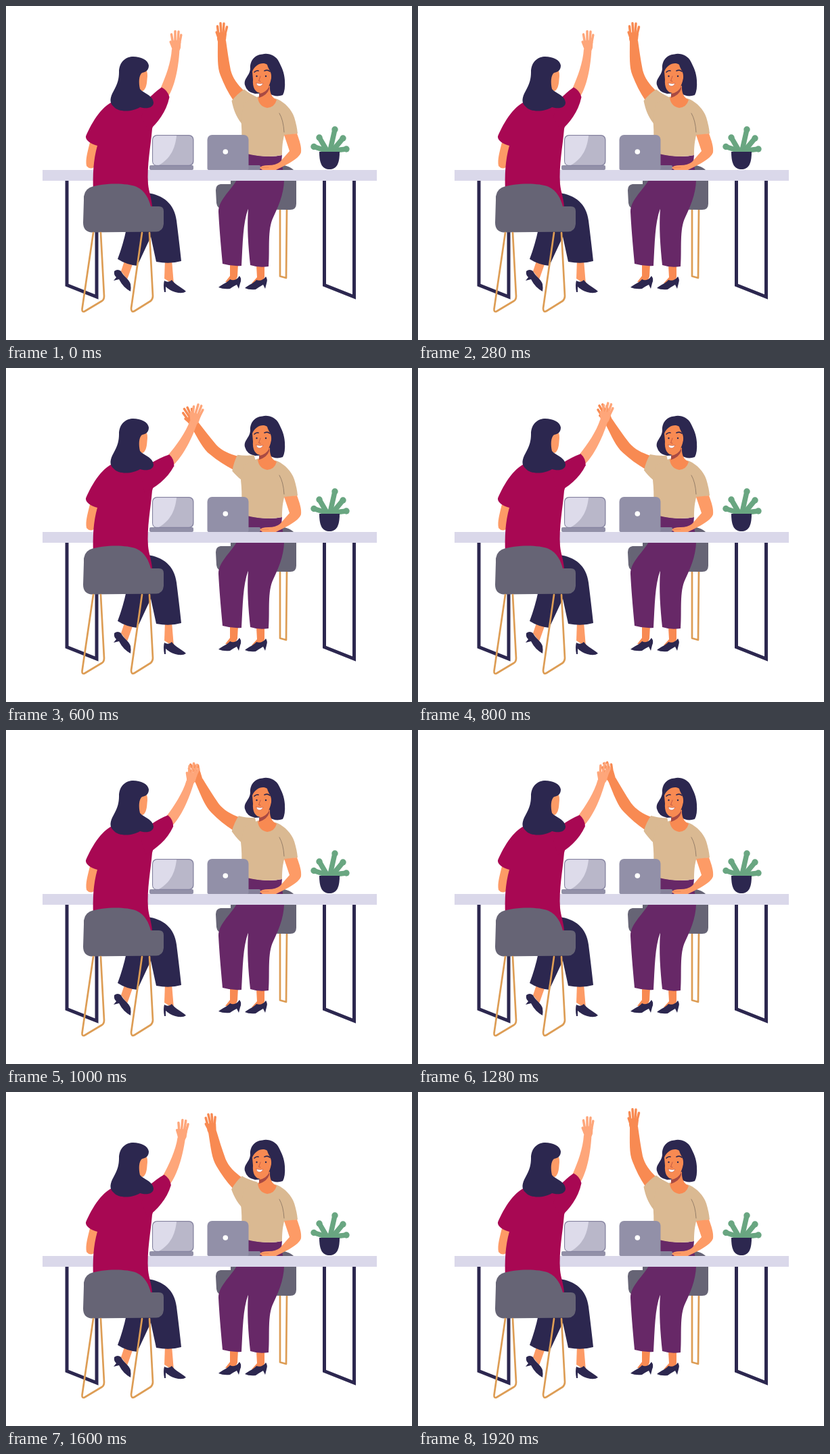
Animation, 600 px wide and 495 px high, one loop 3.48 s. Source, as an HTML page with a canvas:

```html
<!DOCTYPE html>
<html lang="en">
<head>
<meta charset="utf-8">
<title>High five</title>
<style>
  html, body { margin: 0; width: 100%; height: 100%; overflow: hidden; background: #fff; }
  canvas { display: block; }
</style>
</head>
<body>
<canvas id="stage" width="600" height="495"></canvas>
<script>
const ctx = document.getElementById('stage').getContext('2d');
const LOOP = 3480, STEP = 40;
const NAVY = '#2c274f', GREY = '#666475', STEEL = '#9290a8', WOOD = '#dd9d55',
      RED = '#a80853', TAN = '#dab992', PURPLE = '#672867', GREEN = '#69a681',
      SKIN = '#f88a52', PALE = '#fea67a', WARM = '#fd9b66', CREASE = '#86705f';

function fill(d, color) {
  ctx.fillStyle = color;
  ctx.fill(new Path2D(d));
}

function stroke(d, color, width, cap = 'round', join = 'round') {
  ctx.strokeStyle = color;
  ctx.lineWidth = width;
  ctx.lineCap = cap;
  ctx.lineJoin = join;
  ctx.stroke(new Path2D(d));
}

function box(x, y, w, h, r, color) {
  ctx.fillStyle = color;
  ctx.beginPath();
  ctx.roundRect(x, y, w, h, r);
  ctx.fill();
}

function dot(x, y, r, color) {
  ctx.fillStyle = color;
  ctx.beginPath();
  ctx.arc(x, y, r, 0, Math.PI * 2);
  ctx.fill();
}

function turned(x, y, degrees, draw) {
  ctx.save();
  ctx.translate(x, y);
  ctx.rotate(degrees * Math.PI / 180);
  ctx.translate(-x, -y);
  draw();
  ctx.restore();
}

// How far the arms have swung: 1 is palm to palm
const KEYS = [[280, 0], [600, 1.28], [1000, 1.02], [1200, 1], [1900, 0]];

function swing(t) {
  for (let i = 1; i < KEYS.length; i++) {
    const [t0, a] = KEYS[i - 1], [t1, b] = KEYS[i];
    if (t < t1) {
      const u = Math.max(0, (t - t0) / (t1 - t0));
      return a + (b - a) * (1 - Math.cos(Math.PI * u)) / 2;
    }
  }
  return 0;
}

function tableLegs() {
  for (const x of [90, 470.5])
    stroke(`M${x} 258V413.5L${x + 44} 431V258`, NAVY, 5, 'butt', 'miter');
}

function rightSeat() {
  stroke('M405 300V400.5L414 403L415 300', WOOD, 2.7);
  fill('M332 250L332 264L317 264Q310 265 310 273L311 292Q312 300 320 301L420 302Q429 302 429 293V252Q428 240 411 236L396 240Z', GREY);
}

function rightLegs() {
  fill('M331 382L331 400L324 409L338 410L342 401L343 382Z', SKIN);
  fill('M370 384L371 402L363 411L379 411L382 402L382 384Z', SKIN);
  fill('M314 417C320 412 327 410 331 405Q339 409 345 400Q349 405 346 411L344 419L341 413Q335 416 331 419Q321 420 314 417Z', NAVY);
  fill('M353 418C359 413 366 411 370 406Q378 409 384 401Q387 405 385 411L383 419L380 413Q373 417 369 420Q359 421 353 418Z', NAVY);
  fill('M356 218Q385 226 408 221Q406 232 411 250C412 272 406 290 395 313C386 331 390 360 388 386Q373 388 361 384C358 355 356 328 358 300C350 322 350 350 348 385Q334 386 320 382C317 350 315 325 314 305C314 288 330 276 341 258Z', PURPLE);
}

function rightHair() {
  fill('M361 93C360 80 369 72 379 71.5C388 69 399 74 403 82C408 92 411 98 412 110Q413 125 409 132Q398 136 388 129L368 130Q356 128 353 117C351 107 360 104 361 93Z', NAVY);
}

function rightBody() {
  fill('M373 134C384 135 395 136 401 138C412 143 422 153 426 165Q430 178 431 189L411 192C408 204 408 214 408 221Q385 226 356 219L348 200Q349 184 347 166L352 143Z', TAN);
  fill('M375 125L390 118Q389 134 400 139Q397 150 386 151Q374 149 372 136Q376 134 375 125Z', SKIN);
  fill('M374 130Q385 128 389 119L389 123Q386 132 374 136Z', '#a94a43');
  fill('M364 97C368 87 379 82 386 87C388 95 393 97 392 107C389 121 385 127 377 129C368 129 364 120 365 109Z', SKIN);
  stroke('M367 98Q370 95 373 96M382 96Q387 94 390 97', NAVY, 1.7);
  dot(370.5, 104, 1.2, NAVY);
  dot(384, 104, 1.2, NAVY);
  stroke('M376 104L373.5 111L376 111.5', '#bd5544', .9);
  fill('M370 114Q375 116 380 114.5Q377 120 373 118.5Q370 117 370 114Z', '#fff');
  stroke('M370 114Q375 116 380 114.5Q377 120 373 118.5Q370 117 370 114Z', '#b74e43', .5);
  stroke('M404 159Q410 169 411 187', CREASE, .8);
}

function hand(fingers, palm, color) {
  fill(palm, color);
  for (const [x0, y0, x1, y1] of fingers)
    stroke(`M${x0} ${y0}L${x1} ${y1}`, color, 3.5);
}

function rightArm(p) {
  turned(357, 145, -23 * p, () => {
    hand([[314, 43, 312.5, 30], [318, 40, 317, 25.5], [321, 40, 322, 26], [323.5, 43, 326.5, 31], [314, 47, 311.2, 39]],
      'M312 41Q319 36 326 41L325 50Q323 56 319 57Q313 56 312 49Z', SKIN);
    fill('M313 52C313 75 312 91 317 103C322 116 328 128 336 140L352 126C342 116 335 107 332 95C329 80 327 65 325 51Z', SKIN);
    fill('M352 123.5Q342 130 333.5 140.5C336 153 340 164 348 174L366 168L373 136Q360 130 352 123.5Z', TAN);
    stroke('M353 156Q348 163 348 170', CREASE, .8);
  });
}

function table() {
  ctx.fillStyle = '#dad8ea';
  ctx.fillRect(54, 243, 494, 16);
}

function laptops() {
  box(337, 236, 39, 7, 2, '#85829a');
  box(297.5, 191, 61, 52, [7, 7, 2, 2], STEEL);
  dot(324.3, 216, 3.8, '#fff');

  box(212, 236, 65, 7, 2, STEEL);
  box(216, 191, 61.5, 46, 7, '#8583a0');
  box(217.2, 192.2, 59, 43.6, 6, '#b9b7c9');
  fill('M223 192.2H252C250 211 243 226 226 235.8H222Q217.2 235 217.2 230V198Q218 193 223 192.2Z', '#dddbea');
}

function restingArm() {
  fill('M411 191L430 189C434 200 437 209 436 217C433 227 411 237 399 243H379L375 240Q377 236 388 236Q399 236 405 231L419 215Z', WARM);
  stroke('M377 239.5L388 239', '#d97850', .6);
}

function leaf(x0, y0, x1, y1) {
  stroke(`M${x0} ${y0}L${x1} ${y1}`, GREEN, 7.5);
  dot(x1, y1, 4.7, GREEN);
}

function plant() {
  leaf(479, 214, 486, 183);
  leaf(474, 214, 463, 195);
  leaf(483, 214, 498, 196);
  leaf(472, 214, 455, 208.5);
  leaf(486, 214, 503, 212);
  fill('M463 216H493C493 235 488 242 478 242C468 242 463 235 463 216Z', NAVY);
}

function leftLegs() {
  fill('M175 378L170 393L179 405L181 400L188 380Z', WARM);
  fill('M235 376L234 404L248 413L245 376Z', WARM);
  fill('M160 393Q165 389 170 393C173 400 182 405 184 412Q185 418 184 423Q173 417 167 405L159 407L163 402Q159 399 160 393Z', NAVY);
  fill('M234 407Q240 411 245 406C250 413 261 418 266 423Q261 427 250 424Q241 421 236 416L236 424L234 424Q232 413 234 407Z', NAVY);
  fill('M209 277C232 280 249 293 252 318Q256 350 259 378Q242 383 222 379L214 342L194 385Q177 383 165 375Q173 354 178 330Z', NAVY);
}

function leftBody() {
  fill('M124 202C121 215 117 227 119 237Q124 243 130 239L137 204Z', WARM);
  fill('M163 140C143 145 127 172 118 193C117 199 126 205 135 207C129 228 128 250 129 275L205 290L211 297H216C215 284 211 275 210 264C208 236 214 207 216 182L222 160L212 140Z', RED);
}

function leftArm(p) {
  turned(209, 164, 12.8 * p, () => {
    hand([[246.5, 54, 244.5, 42], [250, 52, 250, 37.5], [254, 52, 255, 38], [256.5, 55, 258.8, 43], [246, 60, 243.2, 53]],
      'M244.5 53Q251 48 258.5 53L258 62Q256 69 251 69Q245 67 244.5 60Z', PALE);
    fill('M245 64C244 83 236 105 228 123L240 134C249 119 255 93 256.5 64Z', PALE);
    fill('M230 120.5Q219 128 207 141L200 165L211 185C224 173 237 157 241.5 135Q239 125 230 120.5Z', RED);
  });
}

function leftHead() {
  fill('M196 101L207 95Q210 98 208.5 109C208 118 206 124 202 126L195 124Z', WARM);
  fill('M167 98C167 82 178 75 188 75C199 75 210 80 211 88C211 95 207 98 201 99C196 103 196 114 198 123C204 130 217 132 218 143C218 151 208 153 198 150C187 157 166 158 159 149C152 143 154 135 159 126C165 115 167 108 167 98Z', NAVY);
}

function leftSeat() {
  fill('M115 288Q114 274 124 269C146 262 177 262 193 268C206 274 211 286 214 297L226 297Q233 297 233 304V323Q232 334 222 334.5L126 335.5Q114 334 114 321Z', GREY);
  stroke('M129 336L112.5 449Q112 455 117 452L142 437Q145 435 145 430L140 336', WOOD, 2.7);
  stroke('M201 336L185 448Q185 455 190 452L214 437Q217 434 217 430L212 336', WOOD, 2.7);
}

function render(t) {
  const p = swing(t);
  ctx.fillStyle = '#fff';
  ctx.fillRect(0, 0, 600, 495);
  tableLegs();
  rightSeat();
  rightLegs();
  rightHair();
  rightArm(p);
  rightBody();
  table();
  laptops();
  restingArm();
  plant();
  leftLegs();
  leftBody();
  leftArm(p);
  leftHead();
  leftSeat();
}

const start = performance.now();

function tick() {
  const t = (performance.now() - start) % LOOP;
  render(Math.floor(t / STEP) * STEP);
  requestAnimationFrame(tick);
}
tick();
</script>
</body>
</html>
```
